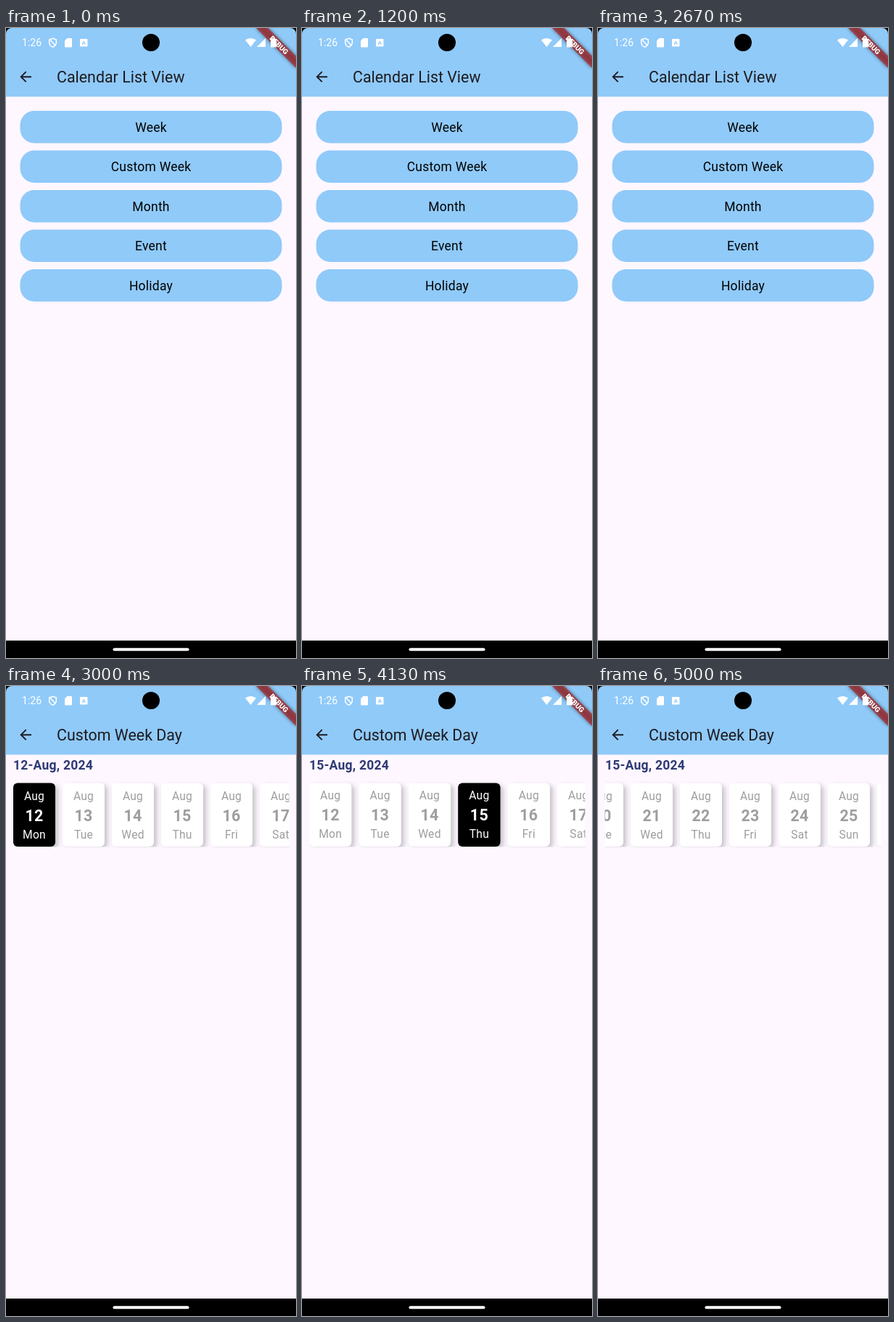
These frames come from a looping animation (400 by 867 pixels, 5.07 s). An HTML page:

```html
<!DOCTYPE html>
<html lang="en">
<head>
<meta charset="utf-8">
<title>Calendar list</title>
<style>
  html, body { margin: 0; width: 100%; height: 100%; overflow: hidden; background: #000; }
  svg { display: block; width: 100vw; height: 100vh; font-family: Roboto, sans-serif; }
  .mid { text-anchor: middle; }
  .paper { fill: #fef7ff; }
  .sky { fill: #90caf9; }
  .title { font-size: 21.4px; fill: #1d1b20; }
  .label { font-size: 17.5px; letter-spacing: .24px; }
  .date { font-weight: 700; fill: #2f3a74; }
  .card { font-size: 15.6px; letter-spacing: .24px; fill: #9e9e9e; }
  .card rect { fill: #fff; filter: drop-shadow(4px 3px 3px #c6c2c8); }
  .card .num { font-size: 21.4px; font-weight: 700; }
  .card.on { fill: #fff; }
  .card.on rect { fill: #000; }
</style>
</head>
<body>
<svg viewBox="0 0 400 867" preserveAspectRatio="none">
  <defs>
    <clipPath id="rowClip"><rect x="9.5" y="130" width="381" height="91.5"/></clipPath>
    <filter id="soft" x="-20%" y="-80%" width="140%" height="260%"><feGaussianBlur stdDeviation="2.4"/></filter>
  </defs>
  <g id="list"></g>
  <g id="week"></g>

  <g transform="translate(400 0) rotate(45)">
    <rect x="-39" y="27.2" width="78" height="11.7" opacity=".5" filter="url(#soft)"/>
    <rect x="-39" y="27.2" width="78" height="11.7" fill="#b71c1c" opacity=".63"/>
    <text class="mid" y="36.6" font-size="9.9" font-weight="900" fill="#fff">DEBUG</text>
  </g>

  <g fill="#fff">
    <text x="22" y="25" font-size="14">1:26</text>
    <path d="M64.5 14.2l4.8 1.9v3.8q0 4.4-4.8 6.4-4.8-2-4.8-6.4v-3.8zM61.2 16.6l6.4 7.2" fill="none" stroke="#fff" stroke-width="1.5"/>
    <path d="M84.5 14h5.3q1.2 0 1.2 1.2v10q0 1.2-1.2 1.2h-7.6q-1.2 0-1.2-1.2v-7.6z"/>
    <rect x="102" y="15" width="10.5" height="10.5" rx="1"/>
    <text class="mid sky" x="107.2" y="23.3" font-size="8" font-weight="700">A</text>
    <path d="M330 16.5q7.5-5 15 0l-7.5 9.500z"/>
    <path d="M358 14v12h-12z"/>
    <path d="M367.5 13.5h3v1.3h2.5v11.7h-8v-11.7h2.5z"/>
  </g>
  <circle cx="200" cy="20" r="12"/>
  <path d="M0 0h8a8 8 0 0 0-8 8zM400 0v8a8 8 0 0 0-8-8z"/>
  <rect y="843" width="400" height="24"/>
  <rect x="147.5" y="853.3" width="105" height="4" rx="2" fill="#fff"/>
</svg>
<script>
  const LOOP = 5070, PITCH = 68;
  const OPEN = 2710, PICK = 3600, SWIPE = 4290, STOP = 5000, TRAVEL = 577;
  const days = ['Sun', 'Mon', 'Tue', 'Wed', 'Thu', 'Fri', 'Sat'];
  const $ = id => document.getElementById(id);
  const ramp = (t, a, b) => Math.min(1, Math.max(0, (t - a) / (b - a)));
  const easeOut = p => 1 - (1 - p) ** 3;
  const smooth = p => p * p * (3 - 2 * p);

  const page = (title, body) => `
    <rect class="paper" width="400" height="844"/>
    <rect class="sky" width="400" height="94.5"/>
    <path d="M35 67.2H21M27.7 60.2l-7 7 7 7" fill="none" stroke="#1d1b20" stroke-width="1.9"/>
    <text class="title" x="70" y="74.5">${title}</text>${body}`;

  const button = (name, i) => `<g transform="translate(0 ${114 + i * 54.5})">
    <rect class="sky" x="19.5" width="361" height="44.5" rx="19.5"/>
    <text class="label mid" x="200" y="28.5">${name}</text></g>`;

  const card = (_, i) => `<g class="card mid" transform="translate(${i * PITCH} 133.5)">
    <rect width="58" height="87.5" rx="6"/>
    <text x="29" y="23">Aug</text>
    <text class="num" x="29" y="52">${12 + i}</text>
    <text x="29" y="76">${days[(i + 1) % 7]}</text></g>`;

  $('list').innerHTML = page('Calendar List View',
    ['Week', 'Custom Week', 'Month', 'Event', 'Holiday'].map(button).join(''));
  $('week').innerHTML = page('Custom Week Day', `
    <text id="date" class="label date" x="10" y="115.3"></text>
    <g clip-path="url(#rowClip)"><g id="row">${Array.from({ length: 20 }, card).join('')}</g></g>`);
  const cards = [...$('row').children];

  function draw(t) {
    // Opening page: a short zoom with a quick fade.
    const open = ramp(t, OPEN, OPEN + 270);
    const zoom = .85 + .15 * easeOut(open);
    $('week').setAttribute('opacity', ramp(open, .1, .35));
    $('week').setAttribute('transform', `translate(200 433.5) scale(${zoom}) translate(-200 -433.5)`);

    const picked = t < PICK ? 0 : 3;
    $('date').textContent = `${12 + picked}-Aug, 2024`;
    cards.forEach((c, i) => c.classList.toggle('on', i === picked));

    // The row stretches slightly at its start, then is swiped along.
    const stretch = 1 + .006 * Math.sin(Math.PI * ramp(t, 3980, 4280));
    const offset = TRAVEL * smooth(ramp(t, SWIPE, STOP));
    $('row').setAttribute('transform', `translate(${10 - offset} 0) scale(${stretch} 1)`);
  }

  const start = performance.now();
  function tick() {
    draw((performance.now() - start) % LOOP);
    requestAnimationFrame(tick);
  }
  tick();
</script>
</body>
</html>
```
